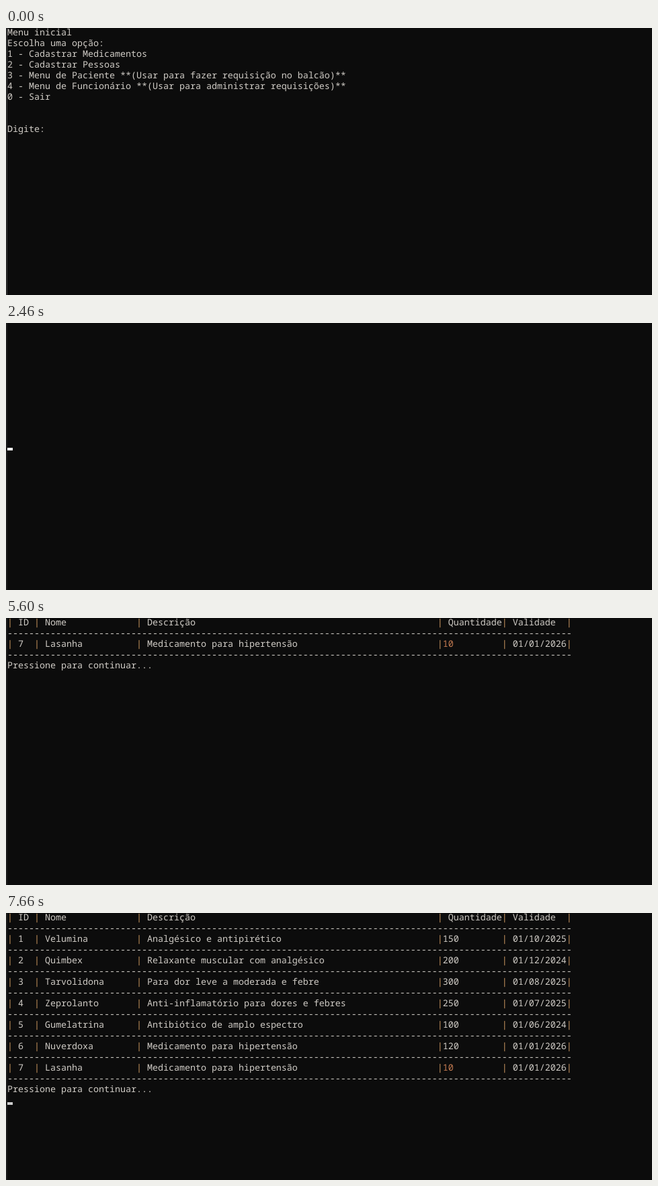
These frames come from a looping animation (961x398 px, 8000 ms). An HTML page:

```html
<!DOCTYPE html>
<html lang="pt-BR">
<head>
<meta charset="utf-8">
<title>Terminal</title>
<style>
  html, body { margin: 0; width: 100%; height: 100%; overflow: hidden; background: #0c0c0c; }
  svg { display: block; width: 961px; height: 398px; }
  text {
    font: 13.3333px "Noto Sans Mono", "DejaVu Sans Mono", monospace;
    fill: #d0ccc6;
    white-space: pre;
    text-rendering: geometricPrecision;
  }
  .bar { fill: #d09a62; }
  .low { fill: #c67c52; }
</style>
</head>
<body>
<svg viewBox="0 0 961 398">
  <rect width="961" height="398" fill="#0c0c0c"/>
  <rect width="1" height="398" fill="#1c1c1c"/>
  <rect id="edge" x="1" width="1" height="398"/>
  <g id="screens"></g>
  <text id="typed"></text>
  <rect id="cursor" width="8" height="4"/>
</svg>
<script>
const LOOP = 8000, CELL = 8, ROW = 16, LEFT = 2;
const NS = "http://www.w3.org/2000/svg";
const $ = id => document.getElementById(id);

const menu = (title, ...options) =>
  [title, "Escolha uma opção:", ...options, "0 - Sair", "", "", "Digite:"];

const stock = [
  ["Velumina", "Analgésico e antipirético", 150, "01/10/2025"],
  ["Quimbex", "Relaxante muscular com analgésico", 200, "01/12/2024"],
  ["Tarvolidona", "Para dor leve a moderada e febre", 300, "01/08/2025"],
  ["Zeprolanto", "Anti-inflamatório para dores e febres", 250, "01/07/2025"],
  ["Gumelatrina", "Antibiótico de amplo espectro", 100, "01/06/2024"],
  ["Nuverdoxa", "Medicamento para hipertensão", 120, "01/01/2026"],
  ["Lasanha", "Medicamento para hipertensão", 10, "01/01/2026"]
].map((item, i) => [i + 1, ...item]);

const line = (id, name, about, amount, date) =>
  "| " + String(id).padEnd(3) + "| " + name.padEnd(17) + "| " + about.padEnd(54) +
  "|" + String(amount).padEnd(11) + "| " + date.padEnd(10) + "|";

function table(items) {
  const rule = "-".repeat(105);
  const rows = [line("ID", "Nome", "Descrição", " Quantidade", "Validade"), rule];
  for (const item of items) rows.push(line(...item), rule);
  return [...rows, "Pressione para continuar..."];
}

const screens = {
  main: menu("Menu inicial",
    "1 - Cadastrar Medicamentos",
    "2 - Cadastrar Pessoas",
    "3 - Menu de Paciente **(Usar para fazer requisição no balcão)**",
    "4 - Menu de Funcionário **(Usar para administrar requisições)**"),
  staff: menu("Menu de Funcionário",
    "1 - Verificar requisições",
    "2 - Atender requisições",
    "3 - Histórico de requisições",
    "4 - Gerenciamento do estoque"),
  stock: menu("Menu de Gerenciamento do estoque",
    "1 - Verificar estoque",
    "2 - Verificar quantidade crítica",
    "3 - Verificar medicamentos em falta"),
  critical: table(stock.filter(item => item[3] <= 10)),
  all: table(stock),
  blank: []
};

// start, screen, typed key, cursor shown, cursor row when the screen is blank
const steps = [
  [0, "main", "", 0],
  [730, "main", "4", 0],
  [860, "main", "4", 1],
  [1330, "blank", "", 1, 11],
  [1400, "staff", "", 1],
  [1930, "staff", "4", 1],
  [2460, "blank", "", 1, 11],
  [2530, "stock", "", 1],
  [3530, "stock", "", 0],
  [4060, "stock", "", 1],
  [4330, "stock", "2", 1],
  [4590, "stock", "2", 0],
  [4790, "blank", "", 1, 10],
  [4860, "critical", "", 1],
  [5600, "critical", "", 0],
  [6130, "critical", "", 1],
  [6660, "critical", "", 0],
  [6860, "blank", "", 1, 5],
  [6930, "stock", "", 1],
  [7390, "stock", "1", 1],
  [7590, "blank", "", 1, 10],
  [7660, "all", "", 1]
];

const baseline = row => row * ROW + 11;

const markup = text => text
  .replace(/\|(10 )|\|/g, (_, low) =>
    '<tspan class="bar">|</tspan>' + (low ? `<tspan class="low">${low}</tspan>` : ""));

const groups = {};
for (const [name, rows] of Object.entries(screens)) {
  const g = groups[name] = document.createElementNS(NS, "g");
  g.innerHTML = rows.map((text, row) =>
    `<text x="${LEFT}" y="${baseline(row)}" xml:space="preserve">${markup(text)}</text>`).join("");
  $("screens").append(g);
}

function draw(t) {
  const [, name, key, shown, blankRow] = steps.findLast(step => step[0] <= t);
  const row = blankRow ?? screens[name].length;
  for (const id in groups) groups[id].setAttribute("display", id === name ? "inline" : "none");

  const typed = $("typed"), cursor = $("cursor");
  typed.textContent = key;
  typed.setAttribute("x", LEFT);
  typed.setAttribute("y", baseline(row));
  cursor.setAttribute("x", LEFT + key.length * CELL);
  cursor.setAttribute("y", row * ROW + 10);
  cursor.setAttribute("fill", name === "blank" ? "#f8f8f8" : "#cccccc");
  cursor.setAttribute("display", shown ? "inline" : "none");
  $("edge").setAttribute("fill", t < 330 ? "#3c3c3c" : "#1e1e1e");
}

const start = performance.now();
function tick() {
  draw((performance.now() - start) % LOOP);
  requestAnimationFrame(tick);
}
tick();
</script>
</body>
</html>
```
